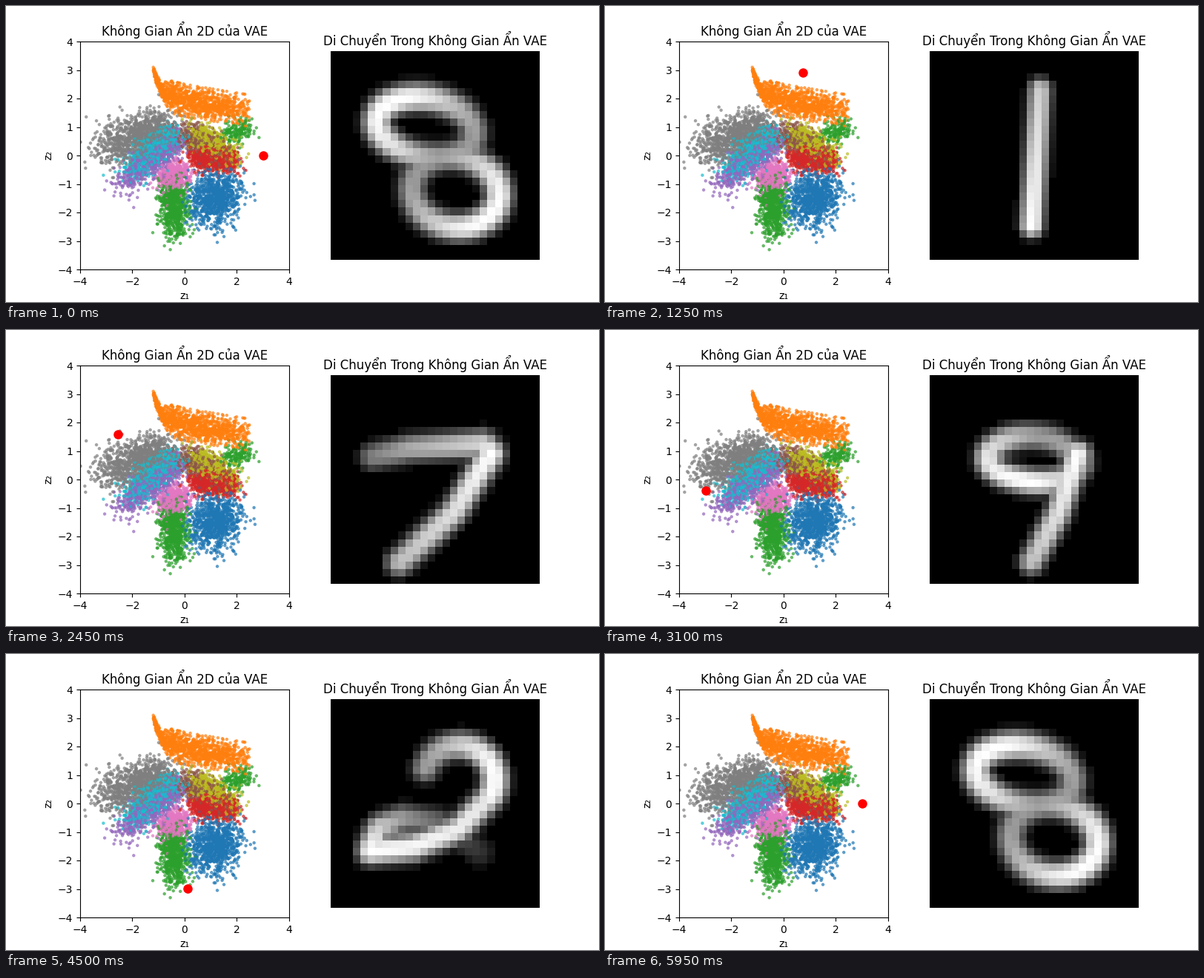
Write a matplotlib script that moves like this. It is 800x400 px and loops after 6 s.

```python
import numpy as np
import matplotlib.pyplot as plt
from matplotlib.animation import FuncAnimation

FRAMES = 120
INTERVAL = 50
SAMPLES = 120
rng = np.random.default_rng(7)


# ---- latent space ----------------------------------------------------------

def blob(label, start, end, spread, count=780):
    """Gaussian cloud along a segment, denser near its start."""
    at = rng.beta(1.2, 1.8, (count, 1))
    xy = np.array(start) * (1 - at) + np.array(end) * at
    xy += rng.normal(0, spread, (count, 2))
    return np.column_stack([xy, np.full(count, label)])


def comet(label, count=1150):
    """Band that narrows and curls upwards on its left."""
    run = 3.7 * rng.beta(1.1, 1.5, count)
    x = run - 1.2
    y = 1.93 - .15 * x + .95 * np.exp(-4 * run)
    y += np.clip(rng.normal(size=count), -2.1, 2.1) * np.minimum(.05 + .3 * run, .27)
    return np.column_stack([x, y, np.full(count, label)])


def latent_points():
    return rng.permutation(np.vstack([
        blob(0, (0.8, -1.7), (1.7, -1.1), .45, 950),
        comet(1),
        blob(2, (-0.45, -1.0), (-0.4, -2.9), .26),
        blob(2, (1.6, 0.85), (2.6, 0.9), .22, 160),
        blob(3, (0.4, -0.05), (2.1, -0.25), .22),
        blob(4, (-0.3, 0.5), (-2.6, -1.15), .26),
        blob(5, (0.0, 0.8), (1.8, -0.2), .25, 450),
        blob(6, (-0.1, -0.7), (-0.8, -0.8), .22, 600),
        blob(7, (-0.7, 0.95), (-3.4, 0.2), .4, 1150),
        blob(8, (0.4, 0.8), (2.1, -0.2), .24, 700),
        blob(9, (-0.4, 0.75), (-2.3, -0.7), .25),
    ]))


# ---- decoded digits, in cells of a 28 x 28 grid ----------------------------

def arc(cx, cy, rx, ry, start, stop, tilt=0, glow=0):
    """Elliptic stroke, brightest towards the glow angle (degrees)."""
    a = np.radians(np.linspace(start, stop, 60))
    z = (rx * np.cos(a) + 1j * ry * np.sin(a)) * np.exp(1j * np.radians(tilt))
    light = .8 + .2 * np.cos(np.angle(z) - np.radians(glow))
    return np.column_stack([cx + z.real, cy + z.imag, light])


def line(*points, fade=(1, 1)):
    light = np.linspace(*fade, len(points))
    return np.column_stack([points, light])


def glyph(width, *parts):
    """Join the parts and resample them evenly along their length."""
    pts = np.vstack(parts)
    steps = np.hypot(*np.diff(pts[:, :2], axis=0).T)
    length = np.r_[0, np.cumsum(steps)]
    at = np.linspace(0, length[-1], SAMPLES)
    cols = [np.interp(at, length, col) for col in pts.T]
    return np.column_stack(cols + [np.full(SAMPLES, width)])


eight = glyph(1.9, arc(12.2, 9.7, 6.6, 3.9, 405, 45, 10, 215),
              arc(16.2, 18.4, 5.9, 4.7, 250, 610, 10, 35))
wide_two = glyph(1.7, arc(14, 10.3, 4.6, 4.6, 200, 390, glow=0),
                 line((18, 12.6), (8, 22)),
                 line((8, 22), (23, 19.6), fade=(.9, .35)))
slant_one = glyph(1.75, line((20.5, 4.6), (17.3, 9.8), (7.7, 22.8), fade=(.75, 1)))
tall_one = glyph(1.6, line((14.3, 4.7), (13.2, 22.9), fade=(.8, 1)))
back_one = glyph(1.5, line((12.2, 4.5), (13.2, 10), (15.6, 22.8), fade=(.75, 1)))
seven = glyph(1.85, line((5.2, 10.4), (10, 9.3), (20, 8.7), (21, 10), fade=(.5, 1)),
              line((21, 10), (16, 18), (8.7, 24.6), fade=(1, .75)))
nine = glyph(1.75, arc(13.2, 10.8, 6.6, 3.3, -20, -380, glow=120),
             line((19.6, 9.5), (17, 18), (13.5, 24.5), fade=(1, .75)))
squat_nine = glyph(1.8, arc(11.4, 11.6, 6.8, 5.4, -20, -380, glow=90),
                   line((18, 6), (18.5, 14), (21, 22.2), fade=(.8, 1)))
loop_two = glyph(1.85, arc(16.7, 10.3, 4.8, 4.6, 200, 390, glow=0),
                 line((20.7, 12.8), (16.6, 17), (10.6, 19.4), (4.8, 19.9), fade=(.9, 1)),
                 line((4.8, 19.9), (6, 16.8), (9, 15.5), (14, 16), (19.5, 20), fade=(1, .2)))
slant_zero = glyph(1.85, arc(14, 14, 9.8, 6, -20, 340, -50, 130))
round_zero = glyph(1.85, arc(14.4, 14.2, 8.8, 6.6, -90, 270, 60, 40))

KEYS = [(0, eight), (260, wide_two), (600, slant_one), (1250, tall_one),
        (1900, back_one), (2450, seven), (3150, nine), (3750, squat_nine),
        (4500, loop_two), (5000, slant_zero), (5480, round_zero), (5950, eight)]
ROWS, COLS = np.mgrid[:28, :28, :1][:2]


def digit(ms):
    """Morph between the neighbouring key glyphs and paint the soft stroke."""
    (t0, a), (t1, b) = next(pair for pair in zip(KEYS, KEYS[1:]) if ms <= pair[1][0])
    x, y, light, width = (a + (b - a) * (ms - t0) / (t1 - t0)).T
    dist = np.hypot(COLS - x, ROWS - y)
    img = (light * np.exp(-(dist / width) ** 2.6)).max(axis=-1)
    img /= img.max()
    return np.where(img < .05, 0, img)


# ---- figure ----------------------------------------------------------------

plt.rcParams["font.family"] = "DejaVu Sans"
fig, (ax, view) = plt.subplots(1, 2, figsize=(8, 4), dpi=100)

px, py, label = latent_points().T
ax.scatter(px, py, c=label, cmap="tab10", s=5, alpha=.6)
ax.set(xlim=(-4, 4), ylim=(-4, 4), xlabel="z₁", ylabel="z₂",
       xticks=range(-4, 5, 2), yticks=range(-4, 5))
ax.set_title("Không Gian Ẩn 2D của VAE")
dot, = ax.plot([], [], "ro", markersize=8)

view.set_title("Di Chuyển Trong Không Gian Ẩn VAE")
view.axis("off")
picture = view.imshow(digit(0), cmap="gray", vmin=0, vmax=1,
                      interpolation="nearest")


def update(i):
    angle = 2 * np.pi * i / (FRAMES - 1)
    dot.set_data([3 * np.cos(angle)], [3 * np.sin(angle)])
    picture.set_data(digit(i * INTERVAL))
    return dot, picture


anim = FuncAnimation(fig, update, frames=FRAMES, interval=INTERVAL,
                     repeat=True, repeat_delay=0)
plt.show()
```
